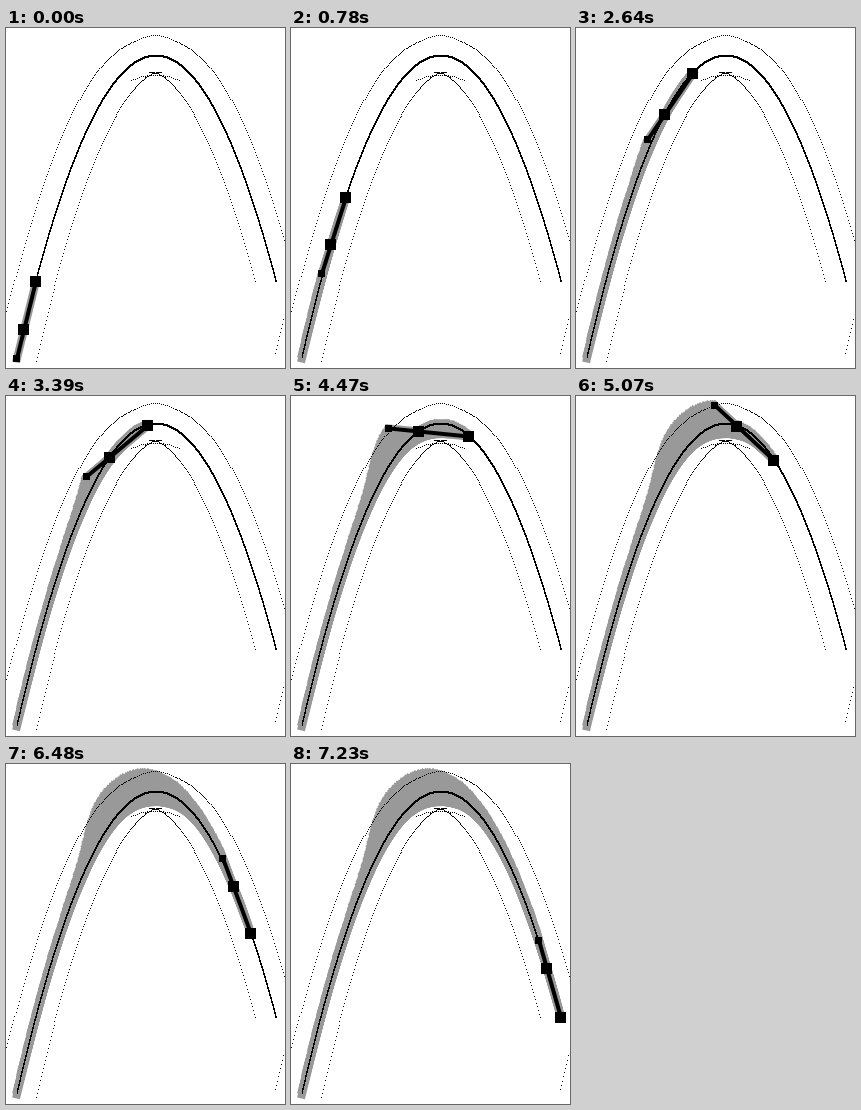
Write an HTML page with a canvas that moves like this. It is 279 by 340 pixels and loops after 7260 ms.

```html
<!DOCTYPE html>
<html>
<head>
<meta charset="utf-8">
<style>
html, body { margin: 0; width: 279px; height: 340px; overflow: hidden; background: #fff; }
canvas { display: block; }
</style>
</head>
<body>
<canvas id="stage" width="279" height="340"></canvas>
<script>
const ctx = document.getElementById('stage').getContext('2d');
const W = 279, H = 340;
const LOOP = 7260, STEP = 30, LAST = 240;
const START = 11, FRONT = 30, END = 270, APEX = 150;
const WHEELBASE = 50, OVERHANG = 30, MARGIN = 20;

const pathY = x => 28 + (x - APEX) ** 2 / 64;
const dot = (x, y) => ctx.fillRect(Math.floor(x - .5), Math.floor(y), 1, 1);

// Both axles ride on the path; the tail extends the line through them.
function pose(n) {
  const fx = FRONT + n, fy = pathY(fx);
  let lo = fx - WHEELBASE, hi = fx;
  for (let i = 0; i < 24; i++) {
    const mid = (lo + hi) / 2;
    if (Math.hypot(fx - mid, fy - pathY(mid)) > WHEELBASE) lo = mid;
    else hi = mid;
  }
  const my = pathY(lo), k = OVERHANG / WHEELBASE;
  const tail = [Math.max(START, lo + (lo - fx) * k), my + (my - fy) * k];
  return [[fx, fy], [lo, my], tail].map(([x, y]) => [Math.round(x), Math.floor(y)]);
}
const poses = Array.from({ length: LAST + 1 }, (_, n) => pose(n));

function body([front, , tail], width, color) {
  ctx.lineWidth = width;
  ctx.strokeStyle = color;
  ctx.beginPath();
  ctx.moveTo(tail[0], tail[1] + .5);
  ctx.lineTo(front[0], front[1] + .5);
  ctx.stroke();
}

function square([x, y], r) {
  ctx.fillRect(x - r - 1, y - r, 2 * r + 1, 2 * r + 1);
}

function drawPath() {
  for (let x = START; x <= END; x++) {
    const a = Math.floor(pathY(x)), b = Math.floor(pathY(Math.min(x + 1, END)));
    ctx.fillRect(x, Math.min(a, b) - 1, 1, Math.abs(a - b) + 2);
  }
}

function drawMargins() {
  // Side arms: the normal is taken a little further down the path
  for (let x = START; x <= END; x++) {
    const u = x - APEX;
    if (Math.abs(u) < 7) continue;
    const slope = (u + Math.sign(u) * 20) / 32, len = Math.hypot(1, slope);
    const dx = MARGIN * slope / len, dy = MARGIN / len, y = pathY(x);
    const outer = x + dx;
    dot(outer < 0 ? outer + W : outer, y - dy);
    if (y + dy < (u < 0 ? 334 : 254)) dot(x - dx, y + dy);
  }
  // Caps over the apex
  for (let u = -24; u <= 24; u += 2) {
    if (Math.abs(u) <= MARGIN) dot(APEX + u, 7.5 + u * u / 64);
    dot(APEX + u, 47 + u * u / 100);
  }
}

function draw(t) {
  const n = Math.min(LAST, Math.max(0, Math.floor((t - STEP) / STEP)));
  ctx.fillStyle = '#fff';
  ctx.fillRect(0, 0, W, H);
  ctx.lineCap = 'square';
  for (let i = 0; i <= n; i++) body(poses[i], 8, '#999');
  ctx.fillStyle = '#000';
  drawMargins();
  drawPath();
  const [front, middle, tail] = poses[n];
  body(poses[n], 4, '#000');
  square(front, 5);
  square(middle, 5);
  square(tail, 3);
}

const began = performance.now();
function tick() {
  draw((performance.now() - began) % LOOP);
  requestAnimationFrame(tick);
}
tick();
</script>
</body>
</html>
```
